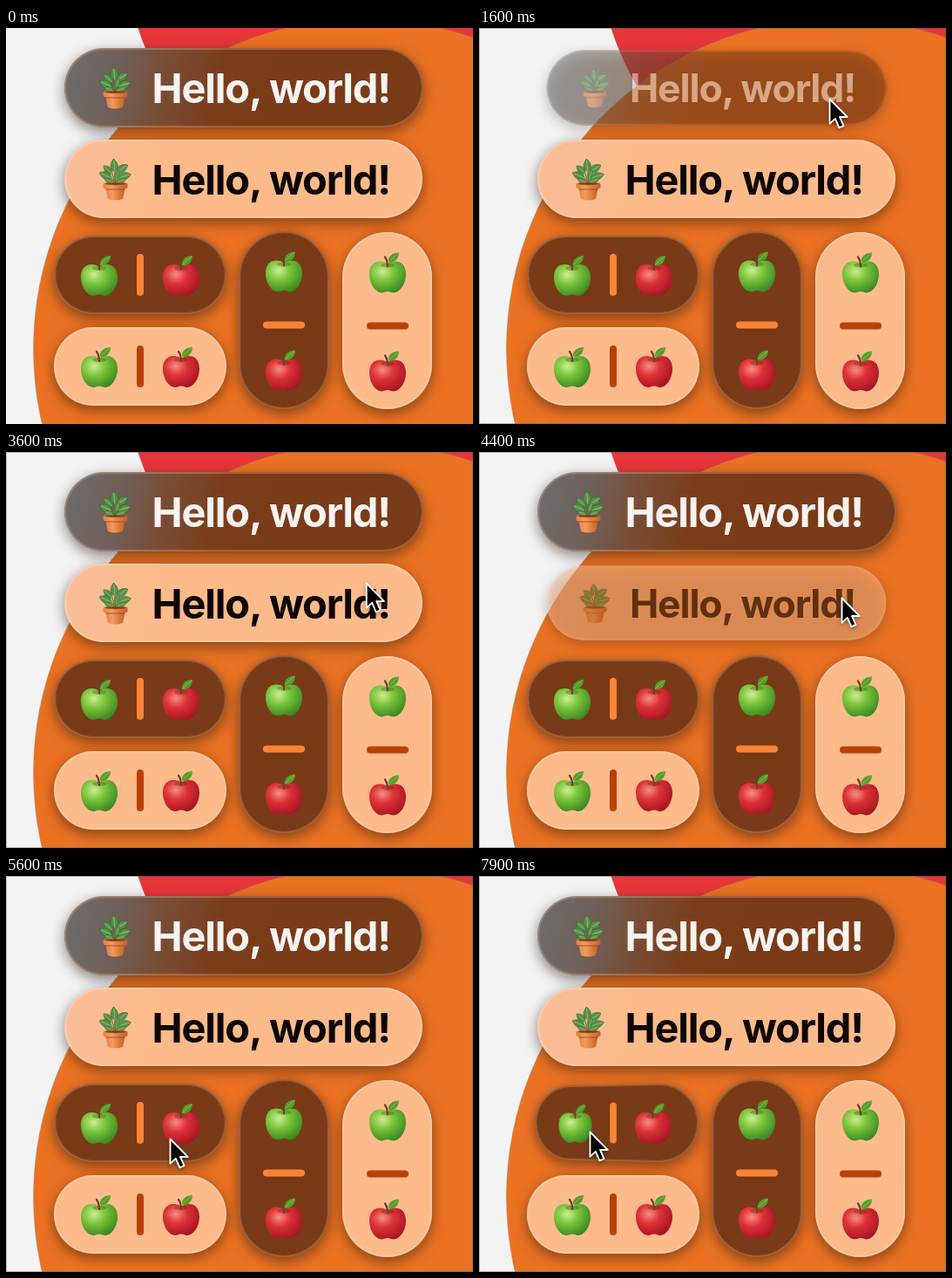
Recreate the animation shown at these times as an HTML page. Size 536 px wide and 454 px high, loop 8 s.

```html
<!DOCTYPE html>
<html lang="en">
<head>
<meta charset="utf-8">
<style>
html, body { margin: 0; width: 100%; height: 100%; overflow: hidden; background: #f3f3f3; }
#stage { position: absolute; left: 0; top: 0; width: 536px; height: 454px; overflow: hidden; }
#stage > svg { position: absolute; left: 0; top: 0; }
.pill { position: absolute; }
.shadow, .face { position: absolute; inset: 0; border-radius: 52px; }
.shadow { background: rgba(30, 16, 6, .5); filter: blur(8px); transform: translateY(5px); }
.face::after {
  content: ""; position: absolute; inset: 0; border-radius: inherit;
  box-shadow: inset 0 0 0 2px var(--rim), inset 0 0 4px var(--rim);
}
.face svg { position: absolute; left: 0; top: 0; overflow: visible; }
.dark .face { background: #793a17; --rim: rgba(255, 200, 160, .22); }
.light .face { background: #fdba8b; --rim: rgba(255, 235, 215, .24); }
.dark.wide .face { background: linear-gradient(102deg, #6d6a69 4%, #705f57 17%, #784c34 29%, #7b3d1a 44%, #793a17 60%); }
.light.wide .face { background: linear-gradient(102deg, #f9bf9a, #fdba8b 30%); }
.wide text { font: 700 47px Inter, "Liberation Sans", sans-serif; letter-spacing: -1.2px; }
#edge { position: absolute; inset: 0; box-shadow: inset 0 0 0 1px rgba(90, 90, 90, .4); }
</style>
</head>
<body>
<div id="stage">
  <svg width="536" height="454">
    <defs>
      <radialGradient id="green" cx=".36" cy=".32" r=".75">
        <stop offset="0" stop-color="#cdee92"/><stop offset=".4" stop-color="#7dc53d"/><stop offset="1" stop-color="#37861f"/>
      </radialGradient>
      <radialGradient id="red" cx=".36" cy=".32" r=".75">
        <stop offset="0" stop-color="#f78d83"/><stop offset=".4" stop-color="#dd3337"/><stop offset="1" stop-color="#a31322"/>
      </radialGradient>
      <linearGradient id="clay">
        <stop offset="0" stop-color="#e18145"/><stop offset=".35" stop-color="#f39a5c"/><stop offset="1" stop-color="#c25e28"/>
      </linearGradient>
      <path id="body" d="M0-14C6-19 21-19 21-2C21 10 13 19 7 19C4 19 3 17.5 0 17.5S-4 19-7 19C-13 19-21 10-21-2C-21-19-6-19 0-14Z"/>
      <g id="top">
        <ellipse cy="-12.5" rx="8" ry="2.5" fill="#301800" opacity=".25"/>
        <path d="M0-11Q0-18-3-22" fill="none" stroke="#6b4423" stroke-width="2.2" stroke-linecap="round"/>
        <path d="M1-16C0-23 6-27 13-27C13-20 8-15 1-16Z" fill="#549d2b"/>
        <path d="M1-16Q6-22 12-26" fill="none" stroke="#83c04b"/>
      </g>
      <g id="leaf">
        <path d="M0 0C-6-4-5-10 0-15C5-10 6-4 0 0Z" fill="#56914a" stroke="#3a6a30" stroke-width=".6"/>
        <path d="M0 0V-13" stroke="#9cc47c" stroke-width=".8"/>
      </g>
    </defs>
    <circle cx="501" cy="-115" r="368" fill="#e6363a"/>
    <circle cx="410" cy="368" r="378.5" fill="#eb7223" stroke="#a08060" stroke-opacity=".45"/>
  </svg>
  <div id="edge"></div>
  <svg id="cursor" width="40" height="50" overflow="visible" style="filter:drop-shadow(0 2px 2px rgba(0,0,0,.35))">
    <path transform="translate(.5 1.5) scale(.94)" d="M0 0V30L6.800 23.800L11.600 35L17 32.700L12.200 21.800H21.500Z" stroke="#fff" stroke-width="2" stroke-linejoin="round"/>
  </svg>
</div>
<script>
const stage = document.getElementById("stage");
const cursor = document.getElementById("cursor");
const edge = document.getElementById("edge");

function pill(kind, x, y, w, h, art) {
  const el = document.createElement("div");
  el.className = "pill " + kind;
  el.style.cssText = `left:${x}px;top:${y}px;width:${w}px;height:${h}px`;
  el.innerHTML = `<div class="shadow"></div><div class="face"><svg width="${w}" height="${h}">${art}</svg></div>`;
  stage.insertBefore(el, edge);
  return el;
}

// Leaves: base x, base y, angle, size
const leaves = [
  [20, 15, -6, 1], [17, 17, -48, .9], [22, 15, 58, 1], [16, 22, -66, 1],
  [24, 22, 73, 1], [18, 27, -70, .7], [22, 27, 70, .75], [21, 23, 20, .7]
];
const plant = `<g transform="translate(38 22)">
  ${leaves.map(([x, y]) => `<path d="M20 28L${x} ${y}" stroke="#5b7b35" stroke-width="1.200"/>`).join("")}
  ${leaves.map(([x, y, r, s]) => `<use href="#leaf" transform="translate(${x} ${y}) rotate(${r}) scale(${s})"/>`).join("")}
  <path d="M9 32H32L29 46Q20.500 49 12 46Z" fill="url(#clay)"/>
  <path d="M9 34H32L31.600 36H9.400Z" fill="#9c461b" opacity=".4"/>
  <rect x="6.500" y="27.500" width="28" height="6.500" rx="2" fill="url(#clay)"/>
  <ellipse cx="20.500" cy="28.500" rx="12" ry="1.500" fill="#80401f"/>
</g>`;
const hello = color => `${plant}<text x="100.500" y="63" fill="${color}">Hello, world!</text>`;
const apple = (color, x, y) => `<g transform="translate(${x} ${y})"><use href="#body" fill="url(#${color})"/><use href="#top"/></g>`;
const bar = (x, y, w, h, color) => `<rect x="${x}" y="${y}" width="${w}" height="${h}" rx="4" fill="${color}"/>`;
const pair = color => apple("green", 52, 50) + bar(95, 21, 8, 48, color) + apple("red", 146, 50);
const stack = color => apple("green", 52, 50.5) + bar(28, 103.5, 48, 8, color) + apple("red", 52, 163.5);

const orange = "#fb8437", rust = "#b94006";
const first = pill("dark wide", 67, 23, 412, 91, hello("#f6f3f1"));
const second = pill("light wide", 67, 128, 411, 90, hello("#0c0805"));
const split = pill("dark", 55, 238, 198, 90, pair(orange));
pill("light", 55, 343, 198, 90, pair(rust));
pill("dark", 267, 233, 104, 204, stack(orange));
pill("light", 385.5, 233.5, 103.5, 203, stack(rust));

const ramp = (t, start, length) => {
  const p = Math.min(1, Math.max(0, (t - start) / length));
  return p * p * (3 - 2 * p);
};
const held = (t, down, up, length = 260) => ramp(t, down, length) - ramp(t, up, length);

// Shadow and face fade separately, so the shadow shows through the face
function press(el, p) {
  el.style.transform = `scale(${1 - .052 * p})`;
  for (const layer of el.children) layer.style.opacity = 1 - .5 * p;
}

// Cursor moves: start, duration, target
const moves = [[3100, 700, 416, 166], [4950, 600, 188, 300], [6050, 400, 198, 296], [7150, 450, 127, 292]];

function draw(t) {
  const shown = t >= 1300;
  cursor.style.display = edge.style.display = shown ? "" : "none";
  let x = 402, y = 80;
  for (const [start, length, tx, ty] of moves) {
    const p = ramp(t, start, length);
    x += (tx - x) * p;
    y += (ty - y) * p;
  }
  cursor.style.transform = `translate(${x}px, ${y}px)`;

  press(first, held(t, 1340, 2250));
  press(second, held(t, 4000, 4650));
  const right = held(t, 6560, 6900), left = ramp(t, 7630, 260);
  split.style.transform = `perspective(500px) translateZ(${-12 * (right + left)}px) rotateY(${14 * (right - left)}deg)`;
}

function tick() {
  draw(performance.now() % 8000);
  requestAnimationFrame(tick);
}
tick();
</script>
</body>
</html>
```
